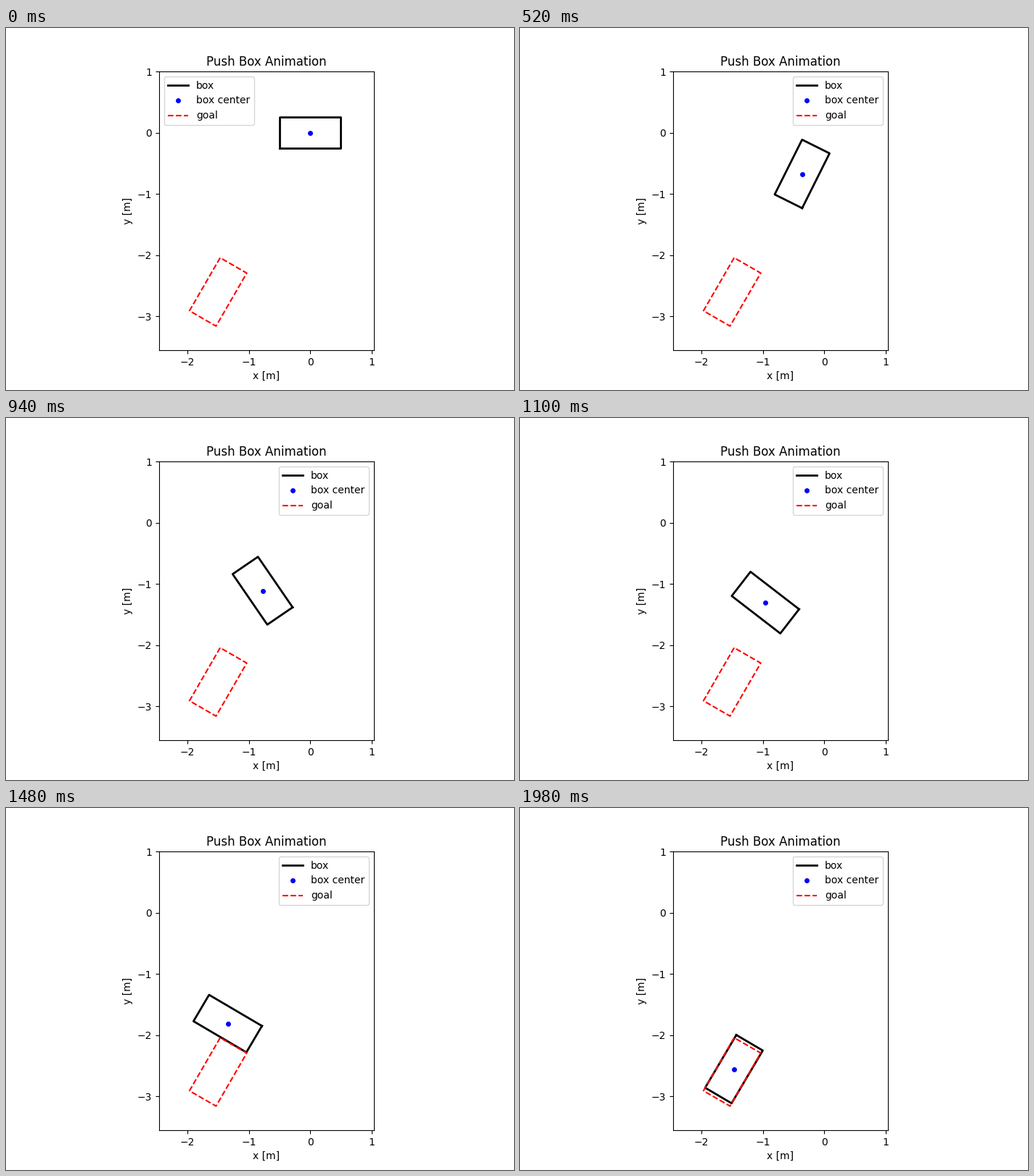
A matplotlib script for the animation above (2000 ms loop, 700 by 500 pixels).

```python
import numpy as np
import matplotlib.pyplot as plt
from matplotlib.animation import FuncAnimation

FRAMES = 100
LENGTH, WIDTH = 1.0, 0.5
SPEED = 0.0335  # metres per step
GOAL = (-1.5 - 2.6j, 240)

# Each push: last step, push direction seen from the box, heading at its end
PUSHES = [
    (8.4, -90, 24),
    (36.7, 180, 87.5),
    (52, 90, 142.3),
    (72, 90, 142.3),
    (92.3, 90, 215.3),
    (99, 0, 239.5),
]


def outline(pos, deg):
    """Closed rectangle outline, starting at its rear right corner."""
    a, b = LENGTH / 2, WIDTH / 2
    corners = np.array([-a - b * 1j, a - b * 1j, a + b * 1j, -a + b * 1j, -a - b * 1j])
    pts = pos + corners * np.exp(1j * np.radians(deg))
    return pts.real, pts.imag


def pose(step):
    """Push the box at constant speed while it turns at a steady rate."""
    pos, deg, start = 0j, 0.0, 0.0
    for end, push, goal_deg in PUSHES:
        n = min(step, end) - start
        if n <= 0:
            break
        turn = (goal_deg - deg) * n / (end - start)
        chord = SPEED * n * np.sinc(turn / 360)
        pos += chord * np.exp(1j * np.radians(push + deg + turn / 2))
        deg += turn
        start = end
    return pos, deg


fig, ax = plt.subplots(figsize=(7, 5), dpi=100)
ax.set_aspect("equal")
ax.set_xlim(-2.465, 1.037)
ax.set_ylim(-3.551, 1)
ax.set_xlabel("x [m]")
ax.set_ylabel("y [m]")
ax.set_title("Push Box Animation")

box, = ax.plot([], [], "k-", lw=2, label="box")
center, = ax.plot([], [], "bo", ms=4, label="box center")
ax.plot(*outline(*GOAL), "r--", lw=1.5, label="goal")
ax.legend(loc="best")


def update(step):
    pos, deg = pose(step)
    box.set_data(*outline(pos, deg))
    center.set_data([pos.real], [pos.imag])
    return box, center


anim = FuncAnimation(fig, update, frames=FRAMES, interval=20, repeat=True,
                     repeat_delay=0, blit=False)
plt.show()
```
